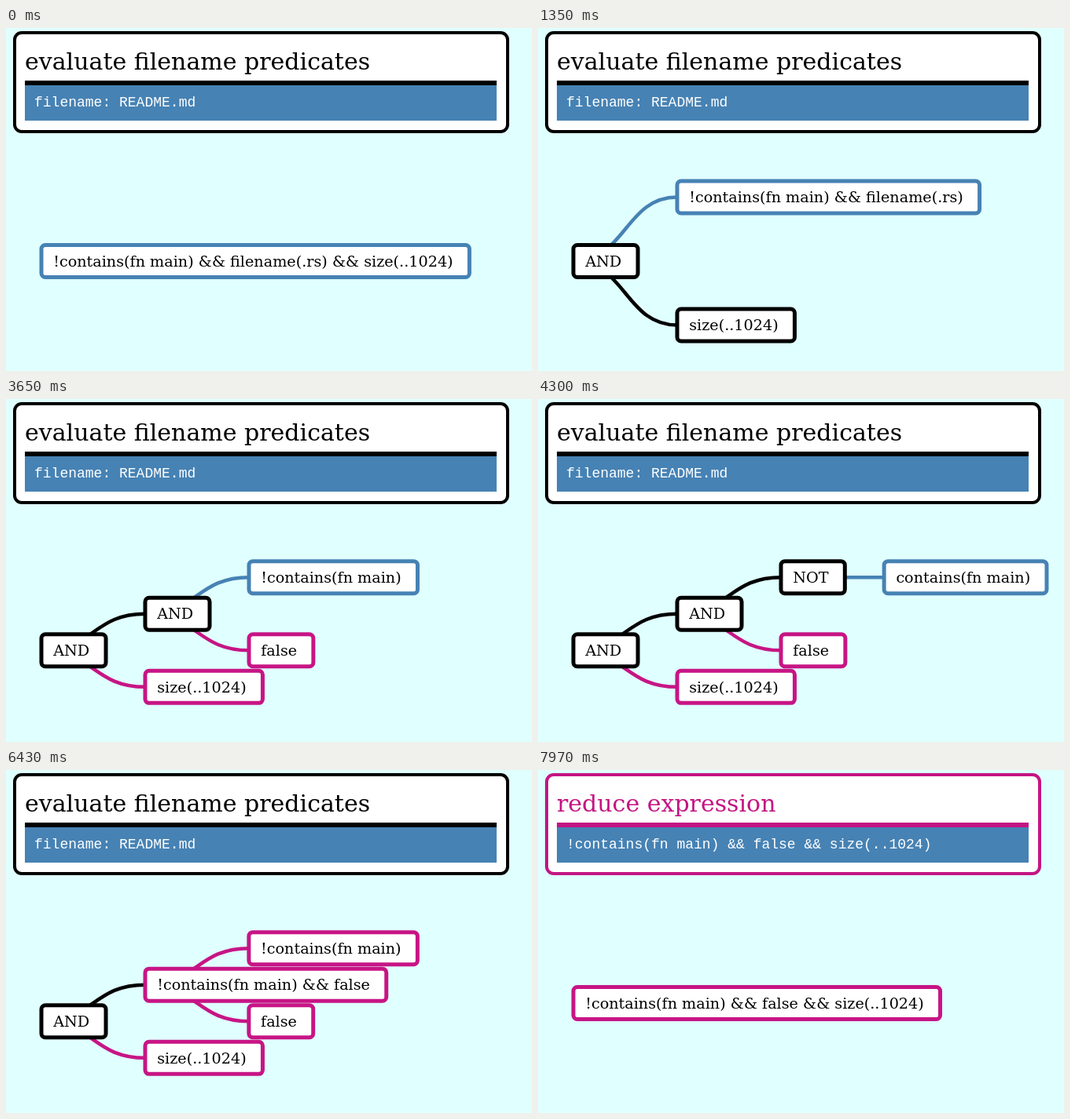
Write an HTML page with a canvas that moves like this. It is 669x437 px and loops after 8 s.

```html
<!DOCTYPE html>
<html lang="en">
<head>
<meta charset="utf-8">
<title>Expression tree</title>
<style>
  html, body { margin: 0; width: 100%; height: 100%; overflow: hidden; background: #e0ffff; }
  canvas { display: block; }
</style>
</head>
<body>
<canvas id="stage" width="669" height="437"></canvas>
<script>
const ctx = document.getElementById('stage').getContext('2d');
const LOOP = 8000, MOVE = 250;
const BLUE = [70, 130, 180], BLACK = [0, 0, 0], PINK = [199, 21, 133];
const SERIF = '"DejaVu Serif", serif', MONO = '"Liberation Mono", monospace';

// A node's id is its path from the root: o, oL, oR, oLL ...
const NOT_MAIN = '!contains(fn main)', SIZE = 'size(..1024)', NAME = 'filename(.rs)';
const REDUCED = `${NOT_MAIN} && false && ${SIZE}`;
const changes = [
  [-MOVE, { o: [`${NOT_MAIN} && ${NAME} && ${SIZE}`, BLUE] }],
  [502, { o: ['AND', BLACK], oL: [`${NOT_MAIN} && ${NAME}`, BLUE], oR: [SIZE, BLUE] }],
  [1115, { oR: [SIZE, BLACK] }],
  [1700, { oR: [SIZE, PINK] }],
  [2280, { oL: ['AND', BLACK], oLL: [NOT_MAIN, BLUE], oLR: [NAME, BLUE] }],
  [2850, { oLR: [NAME, BLACK] }],
  [3435, { oLR: ['false', PINK] }],
  [4080, { oLL: ['NOT', BLACK], oLLL: ['contains(fn main)', BLUE] }],
  [4580, { oLLL: ['contains(fn main)', BLACK] }],
  [5150, { oLLL: ['contains(fn main)', PINK] }],
  [5800, { oLL: [NOT_MAIN, PINK], oLLL: null }],
  [6415, { oL: [`${NOT_MAIN} && false`, PINK], oLL: null, oLR: null }],
  [6985, { o: [REDUCED, PINK], oL: null, oR: null }]
];

const parentOf = id => id.slice(0, -1);
const mix = (a, b, k) => a + (b - a) * k;
const mixColor = (a, b, k) => a.map((v, i) => mix(v, b[i], k));
const css = c => `rgb(${c.map(Math.round)})`;

function ease(u) {
  u = Math.min(1, Math.max(0, u));
  return u < 0.5 ? 4 * u ** 3 : 1 - 4 * (1 - u) ** 3;
}

function rowOf(id, tree) {
  if (!tree.oL) return 297;
  if (!tree.oLL) return { o: 297, oL: 215.5, oR: 378.5 }[id];
  return 134 + 93.14 * { o: 2, oL: 1.5, oR: 2.5, oLL: 1, oLR: 2, oLLL: 1 }[id];
}

function buildStates() {
  let labels = {};
  return changes.map(([time, patch]) => {
    labels = { ...labels, ...patch };
    const tree = {};
    for (const id in labels) {
      if (!labels[id]) continue;
      const [text, color] = labels[id];
      tree[id] = { text, color, x: 45 + 132 * (id.length - 1), y: rowOf(id, labels) };
    }
    return { time, tree };
  });
}
const states = buildStates();

// Entering nodes grow out of their parent, leaving ones fold back into it.
function blend(from, to, k) {
  const nodes = {};
  for (const id of new Set([...Object.keys(to), ...Object.keys(from)])) {
    const a = from[id], b = to[id], up = parentOf(id);
    const start = a || from[up], end = b || to[up], look = b || a;
    const recolor = a && b;
    nodes[id] = {
      text: look.text,
      x: mix(start.x, end.x, k),
      y: mix(start.y, end.y, k),
      alpha: !a ? k : !b ? 1 - k : 1,
      edge: recolor ? mixColor(a.color, b.color, k) : look.color,
      color: recolor && a.text === b.text ? mixColor(a.color, b.color, k) : look.color
    };
  }
  return nodes;
}

function write(text, x, y, font, color) {
  ctx.font = font;
  ctx.fillStyle = color;
  ctx.fillText(text, x, y);
}

function panel(x, y, w, h, r, line, color) {
  ctx.beginPath();
  ctx.roundRect(x, y, w, h, r);
  ctx.fillStyle = '#fff';
  ctx.fill();
  ctx.lineWidth = line;
  ctx.strokeStyle = color;
  ctx.stroke();
}

function drawEdge(a, b) {
  const mid = (a.x + b.x) / 2;
  ctx.beginPath();
  ctx.moveTo(a.x, a.y);
  ctx.bezierCurveTo(mid, a.y, mid, b.y, b.x, b.y);
  ctx.lineWidth = 4.5;
  ctx.strokeStyle = css(b.edge);
  ctx.stroke();
}

function drawNode(n) {
  const font = `19.2px ${SERIF}`;
  ctx.globalAlpha = n.alpha;
  ctx.font = font;
  panel(n.x, n.y - 20.5, ctx.measureText(n.text).width + 36, 41, 5, 5, css(n.color));
  write(n.text, n.x + 15.2, n.y + 6.72, font, '#000');
  ctx.globalAlpha = 1;
}

function drawTree(t) {
  let i = states.length - 1;
  while (i > 0 && states[i].time > t) i--;
  const from = states[Math.max(0, i - 1)].tree;
  const nodes = blend(from, states[i].tree, ease((t - states[i].time) / MOVE));
  for (const id in nodes) if (id !== 'o') drawEdge(nodes[parentOf(id)], nodes[id]);
  Object.values(nodes).forEach(drawNode);
}

function drawHeader(t) {
  const RISE = 440, FALL = 1000, NEXT = 7600;
  const next = t >= NEXT, s = next ? t - NEXT : t;
  const glow = s < RISE ? ease(s / RISE) : 1 - ease((s - RISE) / FALL);
  const color = css(mixColor(BLACK, PINK, glow));
  panel(11, 6, 627, 126, 9, 4, color);
  write(next ? 'reduce expression' : 'evaluate filename predicates', 24, 53, `30px ${SERIF}`, color);
  ctx.fillStyle = color;
  ctx.fillRect(24, 67, 600, 6);
  ctx.fillStyle = css(BLUE);
  ctx.fillRect(24, 73, 600, 45);
  write(next ? REDUCED : 'filename: README.md', 36, 100, `18px ${MONO}`, '#fff');
}

function frame() {
  const t = performance.now() % LOOP;
  ctx.fillStyle = '#e0ffff';
  ctx.fillRect(0, 0, 669, 437);
  drawHeader(t);
  drawTree(t);
  requestAnimationFrame(frame);
}
frame();
</script>
</body>
</html>
```
